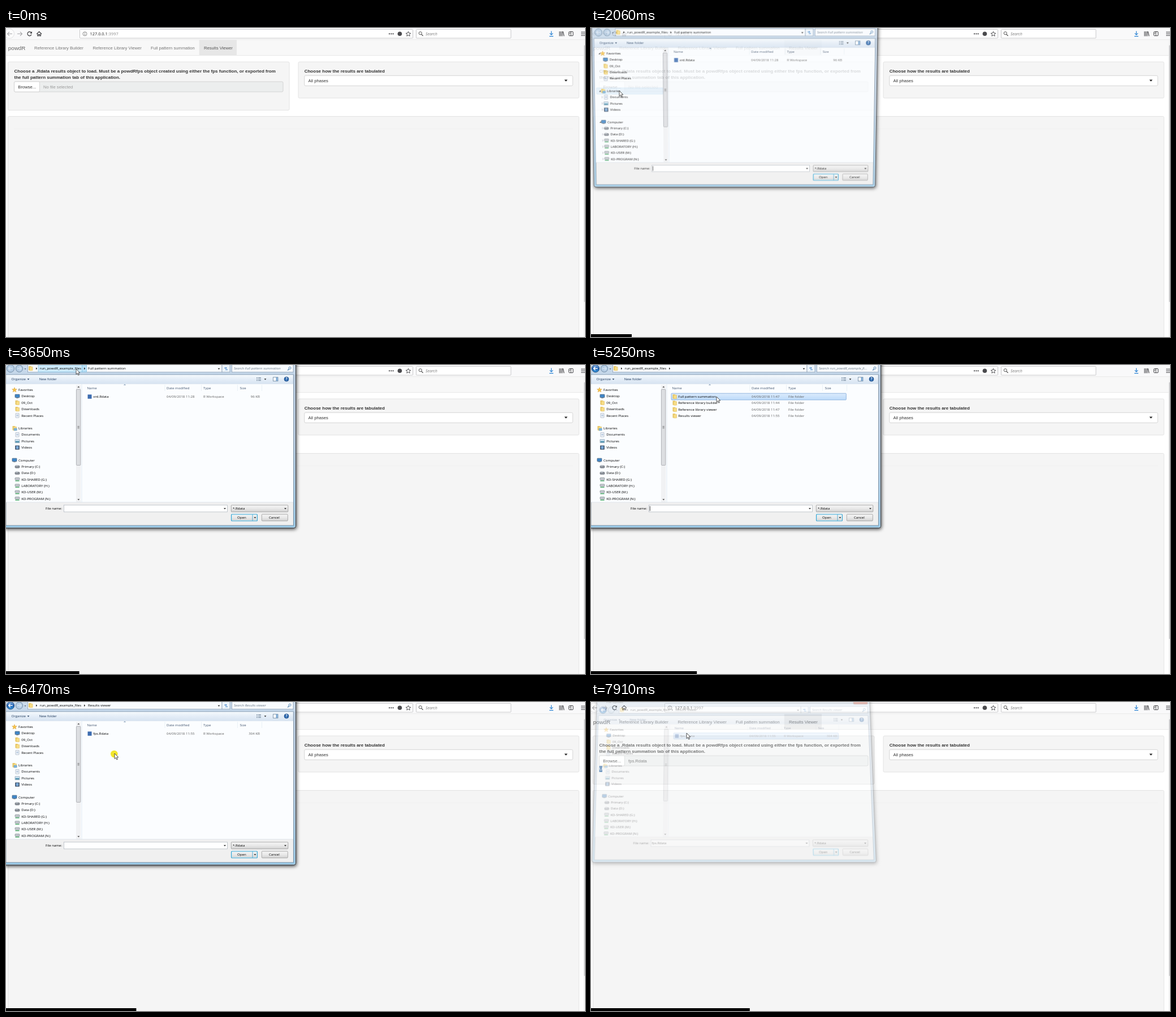
An HTML page for the animation above (8000 ms loop, 1024x547 px).

```html
<!DOCTYPE html>
<html lang="en">
<head>
<meta charset="utf-8">
<title>Results viewer</title>
<style>
  html, body { margin: 0; width: 1024px; height: 547px; overflow: hidden; background: #fff; }
  svg { position: absolute; left: 0; top: 0; width: 1024px; height: 547px; }
  #page, #top { overflow: hidden; }
  #page { font: 7.67px "Liberation Sans", Arial, sans-serif; }
  #dialog { overflow: visible; transform-origin: 0 0; font: 6.1px "Open Sans", "Noto Sans", sans-serif;
    filter: drop-shadow(1.5px 2px 3px rgba(0,0,0,.75)); }
  text { white-space: pre; }
  .ui { font-family: "Open Sans", "Noto Sans", sans-serif; }
</style>
</head>
<body>
<svg id="page" viewBox="0 0 1024 547"></svg>
<svg id="dialog" viewBox="0 0 1024 547"></svg>
<svg id="top" viewBox="0 0 1024 547">
  <rect id="bar" y="542" height="5" fill="#000"/>
  <circle id="click" r="6.3" fill="#f2e62e"/>
  <path id="cursor" d="M0 0V9.6L2.2 7.5L3.8 11.1L5.4 10.4L3.8 6.9H6.8Z" fill="#fff" stroke="#222" stroke-width=".75"/>
</svg>
<script>
const $ = id => document.getElementById(id);

// Drawing helpers that return SVG markup
const rect = (x, y, x2, y2, fill, stroke = 'none', r = 0, more = '') =>
  `<rect x="${x}" y="${y}" width="${x2 - x}" height="${y2 - y}" rx="${r}" fill="${fill}" stroke="${stroke}" ${more}/>`;
const text = (x, y, s, fill = '#000', more = '') => `<text x="${x}" y="${y}" fill="${fill}" ${more}>${s}</text>`;
const line = (d, stroke, w = 1, fill = 'none') =>
  `<path d="${d}" fill="${fill}" stroke="${stroke}" stroke-width="${w}" stroke-linejoin="round"/>`;
const dot = (x, y, r, fill, stroke = 'none', w = 1) =>
  `<circle cx="${x}" cy="${y}" r="${r}" fill="${fill}" stroke="${stroke}" stroke-width="${w}"/>`;
const down = (x, y, w = 2.2, fill = '#222') => `<path d="M${x - w} ${y - w / 2}h${2 * w}l${-w} ${w * 1.1}z" fill="${fill}"/>`;
const right = (x, y, fill = '#222') => `<path d="M${x - 1} ${y - 2}v4l2.2 -2z" fill="${fill}"/>`;
const grad = (id, ...stops) => `<linearGradient id="${id}" x2="0" y2="1">` +
  stops.map((c, i) => `<stop offset="${i / (stops.length - 1)}" stop-color="${c}"/>`).join('') + '</linearGradient>';
const label = (x, yc, s, fill, more) => text(x, yc + 2.1, s, fill, more);

function browser() {
  const ink = '#3d3d40';
  return rect(0, 0, 1024, 21, '#f9f9fa') +
    dot(6, 10, 8.5, '#fcfcfc', '#d5d5d7', .7) +
    line('M11 10.3H2.5M6 6.8L2.5 10.3L6 13.8', '#a3a3a6', 1.1) +
    line('M20 10.3H28.5M25 6.8L28.5 10.3L25 13.8', '#a3a3a6', 1.1) +
    line('M44.6 8.2A3.6 3.6 0 1 0 45 11.5', ink, 1.2) + `<path d="M46 6v3.7h-3.7z" fill="${ink}"/>` +
    line('M54.3 10.5L58.6 6.4L62.9 10.5M55.8 10V14H57.7V11.3H59.5V14H61.4V10', ink, 1.2) +
    rect(130.5, 2.5, 719.5, 18, '#fff', '#c9c9cb', 1) +
    dot(139.5, 10.3, 3.5, 'none', '#666', .8) + line('M139.5 9.8V12.3M139.5 8.1V9', '#666', .9) +
    text(148.5, 13, '127.0.0.1<tspan fill="#8a8a8a">:3997</tspan>', '#222', 'class="ui" font-size="7.4"') +
    [678, 681.3, 684.6].map(x => dot(x, 10.3, 1.1, ink)).join('') +
    dot(696.4, 10.2, 3.8, '#4a4a4d') +
    line('M711.5 6.2L712.8 9L715.8 9.3L713.5 11.3L714.2 14.3L711.5 12.7L708.8 14.3L709.5 11.3L707.2 9.3L710.2 9Z', ink, .9) +
    rect(725.5, 2.5, 893, 18, '#fff', '#c9c9cb', 1) +
    dot(732.8, 9.2, 2.6, 'none', '#555', 1) + line('M734.7 11.2L737.6 14', '#555', 1.2) +
    text(742, 13, 'Search', '#777', 'class="ui" font-size="7" font-style="italic"') +
    line('M964.5 5.5V12M961.7 9.4L964.5 12.2L967.3 9.4M961 14.6H968', '#2b83d3', 1.2) +
    line('M979 6V14.5M981.4 6V14.5M983.8 6V14.5M985 6.2L987 14.3', ink, 1.1) +
    rect(995.5, 6.5, 1003, 13.7, 'none', ink, 1) + line('M999 7V13.3M996.5 9H998.5', ink, .9) +
    line('M1017 7.3H1024M1017 10.3H1024M1017 13.3H1024', ink, 1.1);
}

function page() {
  const gray = '#777', dark = '#333', well = '#f5f5f5', edge = '#e3e3e3', bold = 'font-weight="bold" font-size="8"';
  return browser() +
    rect(0, 21, 1024, 48.5, '#f8f8f8') + line('M0 20.7H1024M0 48.5H1022', '#e4e4e4', .8) +
    rect(341.7, 21.2, 408, 48.3, '#e7e7e7') +
    text(3.8, 38.5, 'powdR', '#666', 'font-size="9.8"') +
    text(50, 37.8, 'Reference Library Builder', gray) + text(153.5, 37.8, 'Reference Library Viewer', gray) +
    text(256, 37.8, 'Full pattern summation', gray) + text(350, 37.8, 'Results Viewer', '#555') +
    rect(3.5, 60, 501, 145.5, well, edge, 2) + rect(517, 60, 1013.3, 124, well, edge, 2) +
    rect(3.5, 156.5, 1013.3, 560, well, edge, 2) + line('M14.5 178.5H1002.5', '#efefef', .8) +
    text(14.5, 78.8, 'Choose a .Rdata results object to load. Must be a powdRfps object created using either the fps function, or exported from', dark, bold) +
    text(14.5, 89.7, 'the full pattern summation tab of this application.', dark, bold) +
    rect(14.5, 95, 490, 113, '#eceeee', '#ccc', 2, 'stroke-width=".8"') +
    rect(14.5, 95, 59.5, 113, '#fff', '#ccc', 2, 'stroke-width=".8"') +
    text(21.3, 106.8, 'Browse...', dark) + '<text id="chosen" x="66" y="106.8"></text>' +
    '<g id="upload">' + rect(14.5, 113.3, 20, 124, '#3a6ea5') +
    '<clipPath id="cut"><rect x="14" y="113" width="6" height="12"/></clipPath>' +
    text(14.8, 121.3, 'Upload', '#fff', 'clip-path="url(#cut)"') + '</g>' +
    text(527.7, 78.8, 'Choose how the results are tabulated', dark, bold) +
    rect(527.8, 84.3, 1002.3, 102.3, '#fff', '#ccc', 2, 'stroke-width=".8"') +
    text(534.5, 95.9, 'All phases', dark) + down(990.3, 93, 2.8) +
    rect(1021.3, 21, 1024, 547, '#f5f5f5') + rect(1022.3, 30.5, 1026, 485, '#c9c9cb', 'none', 1);
}

// Small icons centred on x, y
const icons = {
  folder: (x, y) => rect(x - 3.5, y - 4, x + 1, y + 3.5, '#e8c766', 'none', .6) + rect(x - 2, y - 2.8, x + 3.6, y + 3.8, '#f7dd86', '#dbb550', .6, 'stroke-width=".5"'),
  star: (x, y) => `<path d="M${x} ${y - 4.3}l1.2 3h3.1l-2.4 2 .9 3.2-2.8-1.9-2.8 1.9.9-3.2-2.4-2h3.1z" fill="#f6c64a" stroke="#d8952a" stroke-width=".5"/>`,
  screen: (x, y) => rect(x - 4, y - 3.3, x + 4, y + 2.2, '#3f86c8', '#4b5d70', .5, 'stroke-width=".7"') + rect(x - 2, y + 2.6, x + 2, y + 3.6, '#7d8894'),
  paper: (x, y) => rect(x - 3, y - 3.8, x + 3, y + 3.8, '#f8fafc', '#8b9bb0', .4, 'stroke-width=".6"') + line(`M${x - 1.6} ${y - 1}h3.4m-3.4 1.8h3.4`, '#6f93bd', .7),
  picture: (x, y) => rect(x - 4, y - 3, x + 4, y + 3, '#cfe4f3', '#7d8ea0', .3, 'stroke-width=".6"') + rect(x - 3.4, y, x + 3.4, y + 2.5, '#4f92ad'),
  film: (x, y) => rect(x - 3.8, y - 3.6, x + 3.8, y + 3.6, '#34465e', 'none', .4) + rect(x - 2.3, y - 2.6, x + 2.3, y + 2.6, '#79a9d8'),
  shelf: (x, y) => icons.folder(x, y) + rect(x - 1, y, x + 4.2, y + 4, '#7db4dd', '#5488b4', .3, 'stroke-width=".4"'),
  disk: (x, y) => rect(x - 4, y - 1.6, x + 4, y + 2.4, '#8a9098', '#5a6068', 1.4, 'stroke-width=".6"') + rect(x - 3, y - 2.8, x + 1, y - .8, '#bcc2c9'),
  net: (x, y) => rect(x - 4, y - 3, x + 4, y + .8, '#c3c9cf', '#747c84', 1, 'stroke-width=".6"') + rect(x - 3.6, y + 1.8, x + 3.6, y + 3.2, '#3fa45f'),
  data: (x, y) => rect(x - 3.5, y - 3.7, x + 3.5, y + 3.7, '#3c6cb0')
};

const tree = [
  ['star', 'Favorites', 44, 1], ['screen', 'Desktop'], ['folder', '09_Oct'], ['folder', 'Downloads'], ['paper', 'Recent Places'],
  ['shelf', 'Libraries', 112, 1], ['paper', 'Documents'], ['picture', 'Pictures'], ['film', 'Videos'],
  ['screen', 'Computer', 168.5, 1], ['disk', 'Primary (C:)'], ['disk', 'Data (D:)'], ['net', 'KD-SHARED (G:)'],
  ['net', 'LABORATORY (H:)'], ['net', 'KD-USER (M:)'], ['net', 'KD-PROGRAM (N:)']
];

function sidebar() {
  let y = 0, arrows = '', out = '';
  tree.forEach(([icon, name, start, head]) => {
    y = start || y + 11.35;
    out += icons[icon](head ? 15 : 20, y) + label(head ? 22 : 27.3, y, name);
    if (head) arrows += `<path d="M7.5 ${y + 1.5}l3 0v-3z" fill="#333"/>`;
    else if (y > 115) arrows += line(`M12.5 ${y - 1.7}v3.4l2 -1.7z`, '#aab', .5, '#fff');
  });
  return '<g id="hoverTree">' + rect(3, 106.3, 124, 117.7, '#e6f2fc', '#c3ddf3', 1, 'stroke-width=".6"') + arrows + '</g>' + out;
}

function dialog() {
  const blue = '#1e395b', thin = 'stroke-width=".7"';
  return '<defs>' + grad('glass', '#b3c9e0', '#cddded', '#c3d6e9') + grad('tool', '#f6fafd', '#e4edf7', '#d6e3f1') +
    grad('btn', '#f4f4f4', '#e9e9e9', '#d2d2d2') + grad('pick', '#dcebfc', '#bcdafa') +
    grad('edge', '#b7cbe0', '#b7cbe0', '#97c8e6') + grad('orb', '#8cb9ea', '#1c5cae', '#3aa0e4') + '</defs>' +
    rect(-4, -20, 512.3, 288.3, 'url(#edge)', '#1f2a36', 3) +
    rect(-3.2, -19.2, 511.5, 287.5, 'none', 'rgba(255,255,255,.65)', 2.5, thin) +
    rect(-3, -19, 511.2, 17, 'url(#glass)') +
    label(14, -9, 'File Upload', '#222') + rect(482, -19, 508, -5, '#d2553f', '#7d2a20', 1, thin) +
    '<g id="travel"></g>' + down(34, 7, 1.6, '#456') +
    rect(38.5, -.5, 382, 12.7, '#f8fbfe', '#8598ae', 0, thin) + rect(382, -.5, 396, 12.7, '#eef5fb', '#8598ae', 0, thin) +
    icons.folder(43.5, 6) + right(54, 6.3) + down(376.5, 6.8, 1.9) +
    line('M386 5.3h4m-1.4 -1.5l1.5 1.5l-1.5 1.5M392 8.3h-4', '#2f78c4', 1) +
    rect(399.5, -.5, 508, 12.7, '#f8fbfe', '#8598ae', 0, thin) +
    dot(502, 5.3, 2, 'none', '#4c7fae', .9) + line('M500.5 7l-2.3 2.5', '#4c7fae', 1.2) +
    '<g id="address"></g>' +
    rect(0, 17, 508.3, 284, '#f0f0f0', '#65788c', 0, thin) +
    rect(0, 17.3, 508, 33.5, 'url(#tool)', '#b4c6d9', 0, 'stroke-width=".6"') +
    label(9.5, 25, 'Organize', blue) + down(39.5, 25.3, 1.9, blue) + label(58.7, 25, 'New folder', blue) +
    line('M443 22.5h2m1 0h5M443 25h2m1 0h5M443 27.5h2m1 0h5', '#6c8196', 1) + down(458.5, 25.3, 1.9) +
    rect(472.5, 21.7, 481, 28.3, '#fff', '#55738f', 0, thin) + rect(477.5, 22, 480.7, 28, '#7eaad4') +
    dot(496, 25, 4, '#2c69b0', '#173f73', .6) + text(494.4, 27.4, '?', '#fff', 'font-weight="bold" font-size="6.5"') +
    rect(0, 33.5, 508, 243, '#fbfdff') + sidebar() +
    rect(124, 35.5, 132.3, 243, '#f1f2f4') + rect(124.4, 43, 131.8, 177.5, '#dcdee1', '#9a9da2', 1, thin) +
    line('M126.5 108.5h3.2m-3.2 1.7h3.2m-3.2 1.7h3.2', '#666', .7) +
    '<path d="M126.3 39.8h4l-2 -2.2z" fill="#444"/>' + down(128.3, 238.3, 1.9, '#444') +
    line('M134 33.5V243', '#dfe7f0', .8) +
    line('M281 35V46M345.5 35V46M409.5 35V46M452.5 35V46', '#e3ebf3', .7) +
    '<path d="M207.8 35.8h4.4l-2.2 -2z" fill="#8aa0b8"/>' +
    [[143.5, 'Name'], [284, 'Date modified'], [349, 'Type'], [413.5, 'Size']].map(([x, s]) => label(x, 40.5, s, '#43566f')).join('') +
    '<g id="list"></g>' + line('M0 243H508', '#d6dde5', .7) +
    label(70, 253.8, 'File name:') + rect(102.3, 248, 391.5, 260, '#fff', '#a9b1ba', 0, thin) + down(387, 254.3, 2) +
    '<g id="field"></g>' +
    rect(398.3, 248, 498.8, 260, 'url(#btn)', '#8e8f8f', 1, thin) + label(401, 253.8, '*.Rdata') + down(494, 254.3, 2) +
    rect(398.5, 264.2, 444.5, 276, 'url(#btn)', '#36a0cf', 1.3, 'stroke-width="1.1"') +
    rect(399.4, 265, 443.7, 275.2, 'none', '#a5e2f7', 1, thin) +
    line('M436 264.5V276', '#36a0cf', .8) + down(440.4, 270.3, 2) + label(409, 270, 'Open') +
    rect(452.3, 264.2, 498.3, 276, 'url(#btn)', '#8e8f8f', 1.3, thin) + label(465, 270, 'Cancel');
}

// Folder contents: rows of [icon, name, time, kind, size]
const file = 'R Workspace', dir = 'File folder', root = 'run_powdR_example_files';
const folders = {
  first: { name: 'Full pattern summation', rows: [['data', 'xrd.Rdata', '11:28', file, '96 KB']] },
  root: { name: '', rows: [['Full pattern summation', '47'], ['Reference library builder', '44'],
    ['Reference library viewer', '47'], ['Results viewer', '55']].map(([n, m]) => ['folder', n, '11:' + m, dir, '']) },
  last: { name: 'Results viewer', rows: [['data', 'fps.Rdata', '11:55', file, '304 KB']] }
};

function showFolder(key, picked, hover) {
  const { name, rows } = folders[key], soft = '#606060';
  $('address').innerHTML =
    (hover ? rect(57, 0, 134.5, 12.3, '#cdeafa', '#7fbfe3', 0, 'stroke-width=".7"') + rect(134.5, 0, 142.5, 12.3, '#b9e0f6', '#7fbfe3', 0, 'stroke-width=".7"') : '') +
    label(59.7, 6.3, root) + right(139, 6.3) + label(145, 6.3, name) +
    label(403, 6.3, 'Search ' + (name || 'run_powdR_example_fi...'), '#6d7a88', 'font-style="italic"');
  $('list').innerHTML = rows.map(([icon, s, time, kind, size], i) => {
    const y = 56 + i * 11.35;
    return (i === picked ? rect(142, y - 5.8, 451.3, y + 5.8, 'url(#pick)', '#7da8d8', 1, 'stroke-width=".8"') : '') +
      icons[icon](148, y) + label(154.3, y, s) + label(284, y, '04/09/2018 ' + time, soft) +
      label(349, y, kind, soft) + label(449, y, size, soft, 'text-anchor="end"');
  }).join('');
  const used = key !== 'first';
  $('travel').innerHTML = dot(8, 6.3, 6.6, used ? 'url(#orb)' : '#b4cce4', used ? '#1c3f6c' : '#6d879f', .9) +
    dot(23.5, 6.3, 6.2, '#b4cce4', '#6d879f', .9) +
    line('M11.7 6.3H4.8M7.6 3.3L4.6 6.3L7.6 9.3', used ? '#fff' : '#d3e2f0', 1.5) +
    line('M20 6.3H26.8M24 3.3L27 6.3L24 9.3', '#d3e2f0', 1.5);
}

// Perspective tilt: scale s about centre c, depth g, vertical d and f
const tilt = (s, c, g, d, f) => `matrix3d(${s},0,0,0,${c * g},${d},0,${g},0,0,1,0,${c * (1 - s)},${f},0,1)`;

// Cursor stops: step, x, y
const stops = [[0, 640, 600], [1, 550, 500], [3, 230, 250], [6, 51, 120], [8, 46, 104], [10, 50, 111], [13, 53, 112], [18, 124, 7],
  [20, 124, 7], [25, 223, 55], [26, 222, 56], [30, 192, 91], [32, 192, 91], [36, 169, 55], [40, 169, 55]];

function cursorAt(k) {
  const i = stops.findIndex(p => p[0] > k), a = stops[i - 1], b = stops[i];
  const u = (k - a[0]) / (b[0] - a[0]), e = u * u * (3 - 2 * u);
  return [a[1] + (b[1] - a[1]) * e, a[2] + (b[2] - a[2]) * e];
}

const LOOP = 8000, STEP = 201.9, clicks = [8, 19, 31, 32, 37];

function draw(k) {
  const [x, y] = cursorAt(k);
  const opening = k === 10, closing = k >= 39, open = k >= 10;
  $('bar').setAttribute('width', 7.2 * k);
  $('cursor').setAttribute('transform', `translate(${x} ${y})`);
  $('cursor').style.display = k ? '' : 'none';
  $('click').setAttribute('transform', `translate(${x - .7} ${y + 1})`);
  $('click').style.display = clicks.includes(k) ? '' : 'none';
  $('chosen').textContent = closing ? 'fps.Rdata' : 'No file selected';
  $('chosen').setAttribute('fill', closing ? '#555' : '#999');
  $('upload').style.display = closing ? '' : 'none';

  const box = $('dialog').style;
  box.display = open ? '' : 'none';
  if (!open) return;
  box.opacity = opening ? .83 : closing ? .33 : 1;
  box.transform = opening ? tilt(.979, 251, .00006, .987, 1.7) : closing ? tilt(.935, 215, -.000134, .917, 8.4) : 'none';
  const key = k < 20 ? 'first' : k < 32 ? 'root' : 'last';
  const over = x > 142 && x < 451 ? Math.round((y - 56) / 11.35) : -1;
  showFolder(key, over, key === 'first' && y < 13 && x > 57 && x < 143);
  $('hoverTree').style.display = x < 124 && y > 106 ? '' : 'none';
  const caret = Math.floor(k * 202 / 530) % 2;
  $('field').innerHTML = k >= 37 ? label(104, 253.8, 'fps.Rdata') : caret ? line('M104.3 249.8V258.3', '#111', .8) : '';
}

$('page').innerHTML = page();
$('dialog').innerHTML = dialog();
let last = -1;
function tick() {
  const k = Math.floor((performance.now() % LOOP + 2) / STEP);
  if (k !== last) draw(k);
  last = k;
  requestAnimationFrame(tick);
}
tick();
</script>
</body>
</html>
```
